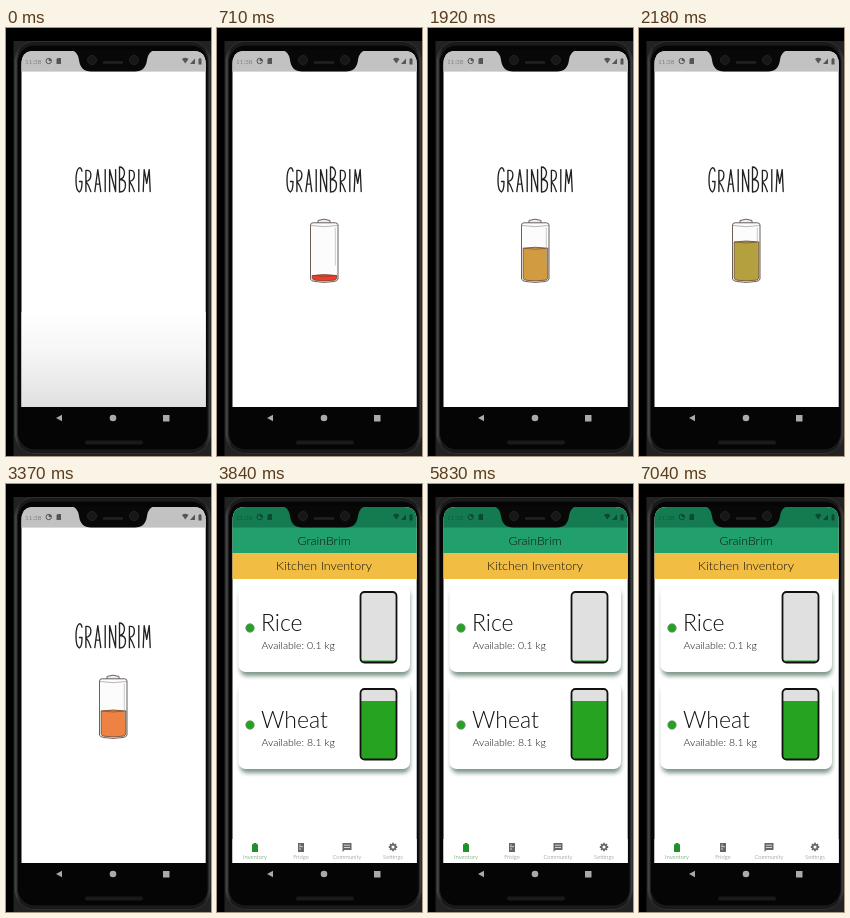
Recreate the animation shown at these times as an HTML page. Size 205 by 428 pixels, loop 8000 ms.

```html
<!DOCTYPE html>
<html lang="en">
<head>
<meta charset="utf-8">
<title>Pantry app</title>
<style>
html, body { margin: 0; width: 100%; height: 100%; overflow: hidden; background: #000; }
svg { display: block; width: 100%; height: 100%; }
text { font-family: Lato, "Open Sans", sans-serif; font-weight: 300; fill: #111; }
.mid { text-anchor: middle; }
.line { fill: none; stroke-linecap: round; stroke-linejoin: round; }
</style>
</head>
<body>
<svg viewBox="0 0 205 428">
  <defs>
    <clipPath id="screen"><path d="M15.5 379V36Q15.5 23 28 23H187Q199.7 23 199.7 36V379Z"/></clipPath>
    <linearGradient id="shade" x2="0" y2="1">
      <stop offset="0" stop-color="#fff"/><stop offset=".45" stop-color="#f5f5f5"/><stop offset="1" stop-color="#e0e0e0"/>
    </linearGradient>
    <linearGradient id="rim">
      <stop offset="0" stop-color="#4a4a4a"/><stop offset=".03" stop-color="#191919"/>
      <stop offset=".97" stop-color="#191919"/><stop offset="1" stop-color="#444"/>
    </linearGradient>
    <filter id="soft" x="-10%" y="-10%" width="120%" height="130%"><feGaussianBlur stdDeviation="2.2"/></filter>
  </defs>

  <rect width="205" height="428" fill="#000"/>
  <rect x="7.5" y="13" width="198" height="415" fill="#222"/>
  <rect x="8.5" y="13.5" width="196" height="412" rx="20" fill="url(#rim)" stroke="#303030"/>
  <rect x="11.5" y="17" width="190.5" height="405" rx="17" fill="#050505" stroke="#1c1c1c"/>

  <g clip-path="url(#screen)">
    <rect x="15" y="22" width="186" height="357" fill="#fff"/>

    <g id="splash">
      <rect x="15" y="22" width="186" height="21.6" fill="#c2c2c2"/>
      <rect id="dim" x="15" y="284" width="186" height="95" fill="url(#shade)"/>
      <g id="wordmark" class="line" role="img" aria-label="GrainBrim" stroke="#222" stroke-width="1.35"></g>
      <g id="battery">
        <path d="M101 195V192.5Q107 189.8 113 192.5V195" fill="#eee" stroke="#555" stroke-width=".9"/>
        <path d="M93.5 197Q93.5 195 96 194.8H118.5Q121 195 121 197V251Q120.5 253 117 253.5Q107 255.3 97.5 253.5Q94 253 93.5 251Z" fill="#fcfcfc" stroke="#5c5048" stroke-width=".9"/>
        <path d="M94 197.5Q107 200 120.5 197.5" class="line" stroke="#888" stroke-width=".6"/>
        <path id="charge" stroke="#6b4a30" stroke-width=".8"/>
        <path id="surface" class="line" stroke="#6b4a30" stroke-width=".6"/>
        <path d="M118.3 200V237" class="line" stroke="#aaa" stroke-width=".6"/>
      </g>
    </g>

    <g id="home">
      <rect x="15" y="22" width="186" height="22" fill="#147a50"/>
      <rect x="15" y="43.5" width="186" height="26.5" fill="#22a06b"/>
      <rect x="15" y="69" width="186" height="26" fill="#f2bd43"/>
      <text class="mid" x="107" y="61" font-size="12.3">GrainBrim</text>
      <text class="mid" x="107" y="86" font-size="12.5">Kitchen Inventory</text>
      <g id="cards"></g>
      <g id="tabs"></g>
    </g>

    <g id="status">
      <text x="19" y="35.5" font-size="6.4" style="fill:currentColor">11:38</text>
      <circle cx="42.7" cy="33" r="2.7" fill="none" stroke="currentColor"/>
      <path d="M42.7 33V30.2A2.8 2.8 0 0 1 45.5 33Z" fill="currentColor"/>
      <path d="M50.5 31L51.8 30H55V36H50.5Z" fill="currentColor"/>
      <path d="M176 31Q179.3 28.6 182.5 31L179.3 35.5ZM184 36L189 30.5V36ZM192.5 31H193.3V30H194.7V31H195.5V36.5H192.5Z" fill="currentColor"/>
    </g>
  </g>

  <path d="M65 22Q72 23.5 73 32Q74.5 43.5 85 43.5H129Q139.5 43.5 141 32Q142 23.5 149 22Z" fill="#080808"/>
  <g stroke="#222">
    <circle cx="86" cy="32" r="4.5" fill="#171717"/>
    <circle cx="128" cy="32" r="4.5" fill="#171717"/>
    <path d="M98 34.5H116" stroke-width="2.5" stroke-linecap="round"/>
  </g>
  <g fill="#aaa">
    <path d="M50 390L56 386.7V393.3Z"/><circle cx="107" cy="390" r="3.3"/><rect x="157" y="387" width="6.5" height="6.5"/>
  </g>
  <rect x="79" y="412.5" width="58" height="4" rx="2" fill="#1a1a1a"/>
</svg>

<script>
const LOOP = 8000;
const $ = id => document.getElementById(id);
const show = (id, on) => $(id).setAttribute('visibility', on ? 'visible' : 'hidden');
const clamp = v => Math.min(1, Math.max(0, v));
const mix = (a, b, p) => a + (b - a) * p;
const snap = (t, start, step) => start + Math.floor((t - start) / step) * step;

// Narrow hand-drawn capitals, 24 units tall: [width, path]
const glyphs = {
  G: [6, 'M6 4Q5 0 3 1Q0 3 0 13Q0 23 3.5 24Q6 23 6 14H3.5'],
  R: [5, 'M0 24V1Q5 0 5 6Q5 12 0 13Q3 17 5 24'],
  A: [6, 'M0 24L3 0L6 24M1 16H5'],
  I: [1, 'M.5 0V24'],
  N: [6, 'M0 24V0L6 24V0'],
  B: [6, 'M0 0V24Q6 24 6 17Q6 12 0 12Q5 11 5 5Q4 0 0 0'],
  M: [7, 'M0 24L1 0L3.5 15L6 0L7 24']
};

function buildWordmark() {
  let x = 70;
  $('wordmark').innerHTML = [...'GRAINBRIM'].map((c, i) => {
    const [w, d] = glyphs[c], tall = i === 0 || i === 5;
    const y = tall ? 139 : 141.5, k = tall ? 1.04 : .92;
    const out = `<path d="${d}" transform="translate(${x} ${y}) scale(1 ${k})"/>`;
    x += w + 3.9;
    return out;
  }).join('');
}

function card(y, name, amount, fillTop) {
  return `<rect x="23" y="${y + 4}" width="170" height="87" rx="7" fill="#527563" opacity=".75" filter="url(#soft)"/>
    <rect x="21.5" y="${y}" width="171.5" height="87" rx="7" fill="#fff"/>
    <circle cx="33" cy="${y + 43}" r="4.2" fill="#22a322" stroke="#6d8a6d" stroke-width=".8"/>
    <text x="44" y="${y + 46}" font-size="23">${name}</text>
    <text x="44.5" y="${y + 64}" font-size="10.5">Available: ${amount} kg</text>
    <rect x="143.5" y="${y + 7}" width="36" height="70.5" rx="4" fill="#e0e0e0"/>
    <path d="M144 ${y + fillTop}H179V${y + 74}Q179 ${y + 77} 176 ${y + 77}H147Q144 ${y + 77} 144 ${y + 74}Z" fill="#26a321"/>
    <rect x="143.5" y="${y + 7}" width="36" height="70.5" rx="4" fill="none" stroke="#111" stroke-width="1.8"/>`;
}

function buildHome() {
  $('cards').innerHTML = card(101, 'Rice', '0.1', 75.5) + card(198, 'Wheat', '8.1', 19);
  const spokes = [0, 45, 90, 135].map(a =>
    `<path d="M176 358.8V367.2" stroke="#666" stroke-width="1.8" transform="rotate(${a} 176 363)"/>`).join('');
  const icons = [
    '<path d="M36.5 359H39.5V360.2H41V368H35V360.2H36.5Z" fill="#22902a"/>',
    '<path d="M81 359H87V368H81Z" fill="#666"/><path d="M82 362.7H86M83 360.3V361.8M83 364V366" stroke="#fff" stroke-width=".7"/>',
    '<path d="M125.5 359H134.5V366H127.5L125.5 368Z" fill="#666"/><path d="M127 361.2H133M127 363.5H133" stroke="#fff" stroke-width=".7"/>',
    spokes + '<circle cx="176" cy="363" r="2.3" fill="#fff" stroke="#666" stroke-width="1.5"/>'
  ];
  const labels = ['Inventory', 'Fridge', 'Community', 'Settings'];
  $('tabs').innerHTML = '<rect x="15" y="355" width="186" height="24" fill="#fff"/>' + icons.join('') +
    labels.map((s, i) => `<text class="mid" x="${38 + 46 * i}" y="374.5" font-size="5.8" style="fill:${i ? '#777' : '#388a45'}">${s}</text>`).join('');
}

// Top edge of the battery charge
function levelAt(t) {
  if (t < 970) return mix(250, 242, clamp((snap(t, 500, 67) - 500) / 470));
  if (t < 1370) return 242;
  if (t < 2180) return mix(240, 213.5, clamp((snap(t, 1370, 68.5) - 1370) / 700));
  if (t < 3100) return 213;
  return t < 3370 ? 239 : 226;
}

function chargeColor(level) {
  const stops = [[240, 248, 56, 42], [226, 238, 130, 66], [219, 208, 156, 66], [213, 180, 160, 62]];
  let i = 0;
  while (i < 2 && level < stops[i + 1][0]) i++;
  const [a, b] = [stops[i], stops[i + 1]];
  const p = clamp((a[0] - level) / (a[0] - b[0]));
  return `rgb(${[1, 2, 3].map(k => Math.round(mix(a[k], b[k], p)))})`;
}

function draw(t) {
  const home = t >= 3840;
  show('splash', !home);
  show('home', home);
  $('status').setAttribute('color', home ? '#0b4a30' : '#555');
  $('dim').setAttribute('opacity', t < 500 ? 1 : clamp(1 - (snap(t, 500, 67) - 433) / 200));
  $('battery').setAttribute('opacity', home || t < 570 ? 0 : 1);
  const y = levelAt(t);
  $('charge').setAttribute('d', `M95.2 ${y + 1}Q107 ${y - 1} 119.8 ${y + 1}V250Q119.5 252 117 252.2Q107 253.6 98 252.2Q95.4 252 95.2 250Z`);
  $('charge').setAttribute('fill', chargeColor(y));
  $('surface').setAttribute('d', `M95.5 ${y + 1}Q107 ${y + 3} 119.5 ${y + 1}`);
}

buildWordmark();
buildHome();
const start = performance.now();
function tick() {
  draw((performance.now() - start) % LOOP);
  requestAnimationFrame(tick);
}
tick();
</script>
</body>
</html>
```
